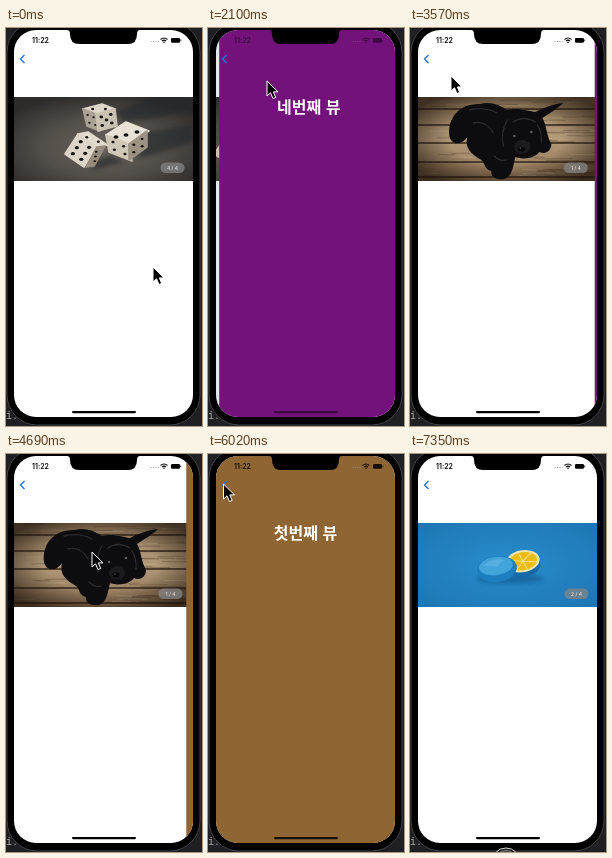
Animation of 196x398 px, one loop 7490 ms. Source, as an HTML page:

```html
<!DOCTYPE html>
<html lang="ko">
<head>
<meta charset="utf-8">
<title>Carousel demo</title>
<style>
html, body { margin: 0; width: 100%; height: 100%; overflow: hidden; background: #202024; }
svg { display: block; width: 100vw; height: 100vh; }
.title { font: bold 16px "Noto Sans CJK KR", "Noto Sans CJK", sans-serif; fill: #fff; text-anchor: middle; }
.badge { font: 500 5px Inter, sans-serif; fill: #ddd; text-anchor: middle; }
.clock { font: 600 7px Inter, sans-serif; }
</style>
</head>
<body>
<svg viewBox="0 0 196 398" xmlns="http://www.w3.org/2000/svg">
  <defs>
    <clipPath id="screen"><rect x="8" y="2" width="179" height="387" rx="22"/></clipPath>
    <clipPath id="photo"><rect x="8" y="69" width="179" height="84"/></clipPath>
    <radialGradient id="stone" cx=".5" cy=".6" r=".65">
      <stop stop-color="#69635b"/><stop offset=".55" stop-color="#514d48"/><stop offset="1" stop-color="#2e2c2b"/>
    </radialGradient>
    <linearGradient id="wood" x2="0" y2="1">
      <stop stop-color="#9b8264"/><stop offset=".5" stop-color="#b39a79"/><stop offset="1" stop-color="#8f7456"/>
    </linearGradient>
    <radialGradient id="vignette" r=".62">
      <stop offset=".5" stop-color="#1a1008" stop-opacity="0"/><stop offset="1" stop-color="#1a1008" stop-opacity=".72"/>
    </radialGradient>
    <radialGradient id="sky" r=".7">
      <stop stop-color="#2a8ccb"/><stop offset="1" stop-color="#1d76b4"/>
    </radialGradient>
    <filter id="soft" x="-30%" y="-30%" width="160%" height="160%"><feGaussianBlur stdDeviation="2"/></filter>
  </defs>

  <rect width="196" height="398" fill="#202024"/>
  <text x="0" y="391" font-family="Noto Sans Mono, monospace" font-size="10" fill="#aaa">i:</text>
  <rect x="1" y="-6" width="193" height="403" rx="30" fill="#000" stroke="#424245"/>

  <g clip-path="url(#screen)">
    <g id="home">
      <rect x="8" width="240" height="390" fill="#fff"/>
      <g clip-path="url(#photo)">
        <g id="dice">
          <rect x="8" y="69" width="179" height="84" fill="url(#stone)"/>
          <g fill="#23262c" opacity=".6" filter="url(#soft)">
            <path d="M110 84 146 69H187V82L150 90 118 94Z"/>
            <path d="M138 104 187 97V114L157 124 132 130Z"/>
            <path d="M90 133 104 127 118 134 86 142Z"/>
          </g>
          <g id="cubes"></g>
        </g>
        <g id="dog">
          <rect x="8" y="69" width="179" height="84" fill="url(#wood)"/>
          <g id="planks" fill="none"></g>
          <rect x="8" y="69" width="179" height="84" fill="url(#vignette)"/>
          <path fill="#0d0d0f" d="M40 108C38 90 50 75 71 76 80 73 91 77 98 82 108 79 119 83 126 84 134 80 143 76 154 75 148 81 139 86 133 90 137 96 137 107 142 116 142 123 136 127 130 124 126 130 114 132 106 129 104 137 103 149 95 151 87 152 81 149 82 143 75 142 76 135 72 132 62 126 55 120 58 109 52 118 42 117 40 108Z"/>
          <g fill="none" stroke="#34353a" stroke-width="1.3" stroke-linecap="round" opacity=".75">
            <path d="M60 82Q75 78 88 85M64 95Q77 92 84 105M98 92Q91 104 94 118M104 94Q114 87 126 94M85 128Q91 134 97 132M128 97Q133 105 132 115"/>
          </g>
          <ellipse cx="113" cy="119" rx="8" ry="7" fill="#1b1b1e"/>
          <ellipse cx="112" cy="121" rx="3.5" ry="2.5" fill="#050506"/>
          <g fill="#626368"><circle cx="105" cy="108" r="1.2"/><circle cx="122" cy="104" r="1.2"/><circle cx="111" cy="120" r=".7"/></g>
        </g>
        <g id="lemon">
          <rect x="8" y="69" width="179" height="84" fill="url(#sky)"/>
          <ellipse cx="100" cy="125" rx="34" ry="5" fill="#0d568f" opacity=".6" filter="url(#soft)"/>
          <g transform="rotate(-10 114 108)">
            <ellipse cx="113" cy="111" rx="17" ry="12" fill="#1668a6"/>
            <ellipse cx="113" cy="107" rx="17" ry="11" fill="#efe4b1"/>
            <ellipse cx="113" cy="107" rx="14.5" ry="9" fill="#e9bd16"/>
            <path d="M113 107 100 104M113 107 105 115M113 107 116 116M113 107 127 110M113 107 123 100M113 107 110 98" stroke="#f6df7c"/>
          </g>
          <ellipse cx="87" cy="115" rx="20" ry="13" fill="#1e7fc0" transform="rotate(-8 87 115)"/>
          <ellipse cx="86" cy="112" rx="17" ry="9" fill="#43a4dc" transform="rotate(-8 86 112)"/>
          <path d="M73 112Q81 103 95 106 90 108 87 113 80 111 73 112Z" fill="#65b7e5" opacity=".6"/>
        </g>
        <rect x="154.5" y="134.5" width="24" height="10.5" rx="5.25" fill="#858585" opacity=".75"/>
        <text id="badge" class="badge" x="166.5" y="141.6"></text>
      </g>
      <rect id="dim" x="8" width="240" height="390" opacity="0"/>
    </g>
    <g id="detail">
      <rect id="fill" x="8" width="180" height="390"/>
      <text id="title" class="title" x="97.5" y="85"></text>
    </g>
    <path d="M18.5 27 14.5 31 18.5 35" fill="none" stroke="#2473d2" stroke-width="1.4"/>
    <g id="chrome">
      <text class="clock" x="26" y="15">11:22</text>
      <g fill="#999"><circle cx="145" cy="13.5" r=".6"/><circle cx="147.5" cy="13.5" r=".6"/><circle cx="150" cy="13.5" r=".6"/><circle cx="152.3" cy="13.5" r=".6"/></g>
      <path d="M154.5 11.5Q158 8.5 161.5 11.5M156 13Q158 11.2 160 13" fill="none" stroke="#000" stroke-width="1.1"/>
      <circle cx="158" cy="14.2" r=".8"/>
      <rect x="165" y="10" width="9" height="4.8" rx="1.3"/><rect x="174.4" y="11.5" width=".8" height="1.8"/>
      <rect x="66" y="383" width="64" height="2.2" rx="1.1"/>
    </g>
    <path d="M61 0V2Q64 2 64 6 64 16 73 16H122Q131 16 131 6 131 2 134 2V0Z"/>
  </g>

  <path id="cursor" d="M0 0V15L3.5 11.8 6 17.5 8.7 16.4 6.3 10.9H11Z" fill="#000" stroke="#fff" stroke-width="1"/>
  <g id="ring" fill="none">
    <circle cx="96" cy="408" r="14" fill="#161618" stroke="#d8d8d8"/>
    <circle cx="96" cy="408" r="11.5" fill="#333" stroke="#aaa" stroke-width=".8"/>
  </g>
</svg>
<script>
const LOOP = 7490, STEP = 70, WIDTH = 179;
const el = id => document.getElementById(id);
const show = (id, on) => el(id).setAttribute("display", on ? "inline" : "none");
const shift = (id, x, y = 0) => el(id).setAttribute("transform", `translate(${x} ${y})`);

// A face is given by three corners a, b, d; pips sit at (u, v) inside it.
const PIPS = {
  2: [[.3, .3], [.7, .7]],
  3: [[.25, .25], [.5, .5], [.75, .75]],
  4: [[.27, .27], [.73, .27], [.27, .73], [.73, .73]],
  5: [[.25, .25], [.75, .25], [.5, .5], [.25, .75], [.75, .75]],
  6: [[.2, .28], [.5, .28], [.8, .28], [.2, .72], [.5, .72], [.8, .72]]
};
function face(a, b, d, color, count, size) {
  const at = ([u, v]) => [0, 1].map(i => a[i] + u * (b[i] - a[i]) + v * (d[i] - a[i]));
  const corners = [[0, 0], [1, 0], [1, 1], [0, 1]].map(at).join(" ");
  const pips = PIPS[count].map(at).map(([x, y]) =>
    `<ellipse cx="${x}" cy="${y}" rx="${size}" ry="${size * .8}" fill="#171513"/>`).join("");
  return `<polygon points="${corners}" fill="${color}" stroke="${color}" stroke-width="1.6" stroke-linejoin="round"/>${pips}`;
}
el("cubes").innerHTML = [
  face([77, 81], [96, 76], [90, 86], "#ddd7ca", 2, 1.5),
  face([77, 81], [90, 86], [81, 98], "#aaa294", 4, 1.3),
  face([90, 86], [109, 81], [92, 103], "#c9c1b2", 5, 1.8),
  face([72, 106], [91, 119], [82, 104], "#e2dccf", 2, 1.5),
  face([72, 106], [59, 126], [91, 119], "#dcd5c8", 6, 2.1),
  face([91, 119], [99, 118], [80, 139], "#968d7e", 3, 1.4),
  face([100, 107], [120, 94], [123, 116], "#e8e2d6", 2, 0),
  face([100, 107], [123, 116], [103, 124], "#cfc7b8", 4, 1.6),
  face([123, 116], [141, 103], [123, 132], "#9c9384", 4, 1.5),
  ...[[110, 109], [120, 107], [131, 104]].map(([x, y]) => `<ellipse cx="${x}" cy="${y}" rx="2.5" ry="1.8" fill="#171513"/>`)
].join("");

let seed = 7;
const random = () => (seed = seed * 16807 % 2147483647) / 2147483647;
let grain = "";
for (let i = 0; i < 75; i++) {
  const x = 8 + random() * 165, y = 70 + random() * 82;
  grain += `<path d="M${x} ${y}q15 ${random() * 2 - 1} ${15 + random() * 30} 0" stroke="${i % 3 ? "#5e4630" : "#d0b996"}" stroke-width=".8" opacity=".5"/>`;
}
for (const y of [81, 97, 115, 134, 149]) grain += `<path d="M8 ${y}H187" stroke="#35261a" stroke-width="1.5"/>`;
el("planks").innerHTML = grain;

// time, x, y of the pointer tip
const PATH = [
  [0, 147, 239], [420, 168, 121], [560, 168, 121], [910, 165, 147], [1120, 165, 147],
  [1400, 166, 141], [1750, 166, 141], [2100, 59, 53], [2520, 29, 38], [3080, 15, 30],
  [3220, 15, 30], [3570, 41, 48], [3920, 62, 75], [4200, 98, 105], [4480, 86, 98],
  [4690, 86, 98], [5390, 18, 45], [5670, 15.5, 30], [6020, 15.5, 30], [6720, 102, 363],
  [7140, 97, 382], [7490, 97, 382]
];
function pointer(t) {
  const i = PATH.findIndex(k => k[0] > t);
  const [t0, x0, y0] = PATH[i - 1], [t1, x1, y1] = PATH[i];
  const k = (t - t0) / (t1 - t0);
  return [x0 + (x1 - x0) * k, y0 + (y1 - y0) * k];
}

const VISITS = [
  { push: 1805, pop: 3255, color: "#74127c", title: "네번째 뷰", ink: .45 },
  { push: 4675, pop: 6040, color: "#8f6534", title: "첫번째 뷰", ink: .85 }
];
// Critically damped spring: 0 at the start, settling at 1.
function spring(ms) {
  const s = Math.max(0, ms) * .0202;
  return 1 - (1 + s) * Math.exp(-s);
}

function render(t) {
  const visit = VISITS[t < 4400 ? 0 : 1];
  const cover = t < visit.pop ? spring(t - visit.push) : 1 - spring(t - visit.pop);
  shift("detail", WIDTH * (1 - cover));
  shift("home", -.3 * WIDTH * cover);
  el("dim").setAttribute("opacity", .1 * cover);
  el("fill").setAttribute("fill", visit.color);
  el("title").textContent = visit.title;
  el("chrome").setAttribute("opacity", 1 - (1 - visit.ink) * cover);

  const slide = t < 3000 ? "dice" : t < 5700 ? "dog" : "lemon";
  for (const id of ["dice", "dog", "lemon"]) show(id, id === slide);
  el("badge").textContent = { dice: 4, dog: 1, lemon: 2 }[slide] + " / 4";

  shift("cursor", ...pointer(t));
  show("cursor", t < 7350);
  show("ring", t >= 7350);
}

const start = performance.now();
function tick() {
  const t = (performance.now() - start) % LOOP;
  render(Math.floor(t / STEP) * STEP);
  requestAnimationFrame(tick);
}
tick();
</script>
</body>
</html>
```
